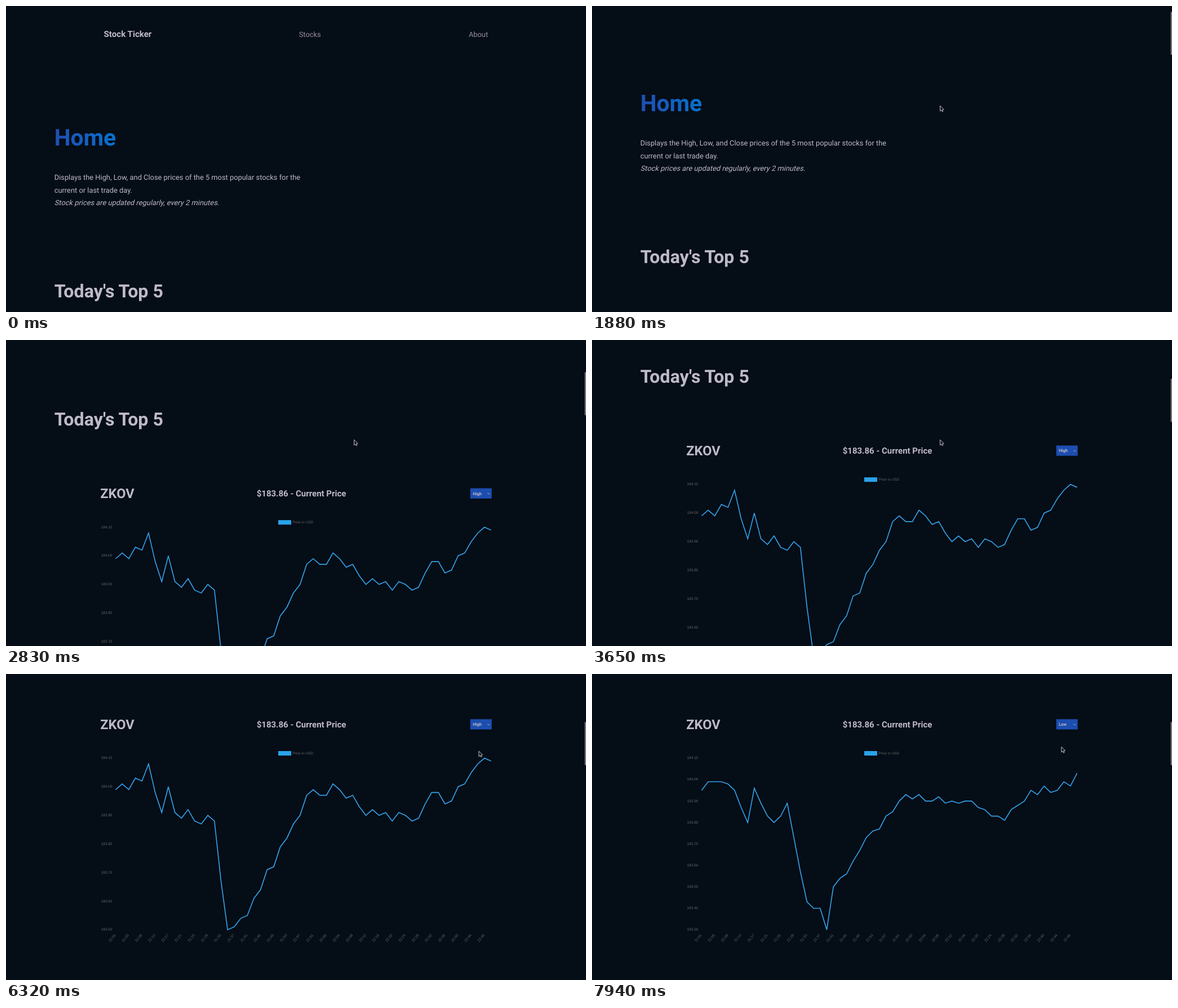
These frames come from a looping animation (1029 by 544 pixels, 8 s). An HTML page:

```html
<!DOCTYPE html>
<html lang="en">
<head>
<meta charset="utf-8">
<title>Stock Ticker</title>
<style>
  html, body { margin: 0; width: 100%; height: 100%; overflow: hidden; background: #050d16; }
  svg { display: block; width: 100%; height: 100%; }
  text { font-family: Roboto, sans-serif; font-size: 12.86px; fill: #bebac8; text-rendering: geometricPrecision; }
  .bold { font-weight: 700; }
  .nav { fill: #96919c; }
  .chart text { font-family: "Liberation Sans", Arial, sans-serif; font-size: 6.43px; fill: #666; }
</style>
</head>
<body>
<svg viewBox="0 0 1029 544">
  <defs>
    <linearGradient id="blue">
      <stop offset="0" stop-color="#1f4eb3"/>
      <stop offset="1" stop-color="#0672ce"/>
    </linearGradient>
  </defs>
  <g id="page">
    <text class="bold" x="173.6" y="55.2" style="font-size:15.1px">Stock Ticker</text>
    <text class="nav" x="519.7" y="55.3">Stocks</text>
    <text class="nav" x="820.9" y="55.3">About</text>
    <text class="bold" x="85.7" y="248" style="font-size:40.9px;fill:url(#blue)">Home</text>
    <text x="85.7" y="309.3">Displays the High, Low, and Close prices of the 5 most popular stocks for the</text>
    <text x="85.7" y="331.8">current or last trade day.</text>
    <text transform="translate(85.7 354.3) skewX(-14)">Stock prices are updated regularly, every 2 minutes.</text>
    <text class="bold" x="85.7" y="518.2" style="font-size:32.2px">Today's Top 5</text>
    <g transform="translate(0 549.7)">
      <text class="bold" x="167.2" y="98" style="font-size:23.6px">ZKOV</text>
      <text class="bold" x="444.7" y="95.2" style="font-size:15px">$183.86 - Current Price</text>
      <rect x="823.7" y="80.4" width="38" height="18.2" fill="#1c4eb0"/>
      <text id="choice" class="bold" x="828.2" y="92.3" style="font-size:7.5px"></text>
      <path d="M854.2 88.8l2.1 2.1l2.1-2.1" fill="none" stroke="#bebac8" stroke-width=".9"/>
      <g class="chart">
        <rect x="483" y="137" width="23" height="8" fill="#2aa2ea"/>
        <text x="508.3" y="142.7">Price in USD</text>
        <g id="prices"></g>
        <g id="times"></g>
        <path id="line" fill="none" stroke="#32a1ea" stroke-width="1.65"/>
      </g>
    </g>
  </g>
  <rect id="scrollbar" x="1026.7" width="2.3" height="76.5" fill="#777c83"/>
  <path id="cursor" d="M0 0V9.5L2.2 7.6L3.8 10.5L5.2 9.8L3.8 6.9L6.6 6.5Z" fill="#0b1119" stroke="#d8d8dc" stroke-width=".9"/>
</svg>
<script>
const LOOP = 8000, FRAME = 80.8, CURSOR_IN = 590, SWITCH = 6811;
const WHEEL_STEP = 61.08, WHEEL_TIME = 240;
const POINTS = 58, CEILING = 110, TOP = 149.6, BOTTOM = 454.7, LEFT = 194.5, STEP = 11.685;

const $ = id => document.getElementById(id);
const clamp = p => Math.min(1, Math.max(0, p));
const smooth = p => p * p * (3 - 2 * p);
const mix = (a, b, p) => a + (b - a) * p;

// Turning points as [index, cents above 183.00]; small seeded jitter fills the gaps
function makeSeries(name, floor, turns) {
  const priceY = cents => mix(TOP, BOTTOM, (CEILING - cents) / (CEILING - floor));
  const ys = Array.from({ length: POINTS }, (_, i) => {
    const next = turns.findIndex(([index]) => index >= i);
    const [endIndex, end] = turns[next];
    if (endIndex === i) return priceY(end);
    const [startIndex, start] = turns[next - 1];
    const jitter = 2 * Math.sin(i * i + floor);
    return priceY(Math.round(mix(start, end, (i - startIndex) / (endIndex - startIndex)) + jitter));
  });
  return { name, floor, priceY, ys };
}

const high = makeSeries("High", 50, [
  [0, 99], [4, 102], [5, 108], [7, 91], [8, 100], [9, 91], [15, 88], [17, 50], [20, 55],
  [29, 97], [34, 99], [37, 93], [45, 88], [48, 98], [51, 95], [56, 110], [57, 109]
]);
const low = makeSeries("Low", 30, [
  [0, 95], [1, 99], [5, 95], [7, 80], [8, 96], [11, 80], [13, 89], [16, 43], [18, 40],
  [19, 30], [20, 50], [28, 83], [31, 93], [40, 90], [46, 81], [50, 95], [56, 97], [57, 103]
]);

const wheelBursts = [
  { start: 1641, ticks: 2, gap: 324 },
  { start: 2232, ticks: 4, gap: 123 },
  { start: 3338, ticks: 2, gap: 245 },
  { start: 3904, ticks: 1, gap: 0 }
];

function scrollAt(t) {
  let turned = 0;
  for (const { start, ticks, gap } of wheelBursts)
    for (let i = 0; i < ticks; i++)
      turned += smooth(clamp((t - start - i * gap) / WHEEL_TIME));
  return turned * WHEEL_STEP;
}

const cursorMoves = [
  { start: 590, time: 404, to: [619.2, 177.5] },
  { start: 1317, time: 243, to: [617.6, 177.4] },
  { start: 4710, time: 728, to: [847, 87] },
  { start: 5762, time: 323, to: [833.3, 140.5] },
  { start: 6166, time: 161, to: [838.9, 137.2] },
  { start: 6731, time: 269, to: [832.9, 138.5] },
  { start: 7862, time: 81, to: [832.9, 129.6] }
];

const cursorAt = t => cursorMoves.reduce((from, { start, time, to }) => {
  const p = smooth(clamp((t - start) / time));
  return from.map((value, axis) => mix(value, to[axis], p));
}, [680, 209]);

let shown;
function showSeries(series) {
  if (shown === series) return;
  shown = series;
  $("choice").textContent = series.name;
  let labels = "";
  for (let cents = CEILING; cents >= series.floor; cents -= 10)
    labels += `<text x="188.4" y="${series.priceY(cents) + 1.7}" text-anchor="end">${(183 + cents / 100).toFixed(2)}</text>`;
  $("prices").innerHTML = labels;
}

$("times").innerHTML = Array.from({ length: POINTS / 2 }, (_, i) => {
  const minute = i < 16 ? 1 + 4 * i : 4 * (i - 16);
  const label = `${i < 16 ? 21 : 22}:${String(minute).padStart(2, "0")}`;
  const x = LEFT - 1 + 2 * STEP * i;
  return `<text text-anchor="end" dy=".35em" transform="translate(${x} 463) rotate(-50)">${label}</text>`;
}).join("");

function draw(time) {
  // The picture advances in coarse steps
  const t = CURSOR_IN + FRAME * Math.floor((time - CURSOR_IN) / FRAME + .3);
  const scroll = scrollAt(t);
  $("page").setAttribute("transform", `translate(0 ${-scroll})`);
  $("scrollbar").setAttribute("y", 1 + scroll * .1535);
  $("cursor").setAttribute("transform", `translate(${cursorAt(t)})`);
  for (const id of ["scrollbar", "cursor"])
    $(id).setAttribute("visibility", time < CURSOR_IN ? "hidden" : "visible");

  const switched = t >= SWITCH;
  showSeries(switched ? low : high);
  const morph = switched ? 1 - (1 - clamp((t - SWITCH + 20) / 1000)) ** 4 : 0;
  $("line").setAttribute("d", "M" + high.ys.map((y, i) =>
    `${(LEFT + STEP * i).toFixed(2)} ${mix(y, low.ys[i], morph).toFixed(2)}`).join("L"));
}

const begin = performance.now();
function loop() {
  draw((performance.now() - begin) % LOOP);
  requestAnimationFrame(loop);
}
loop();
</script>
</body>
</html>
```
